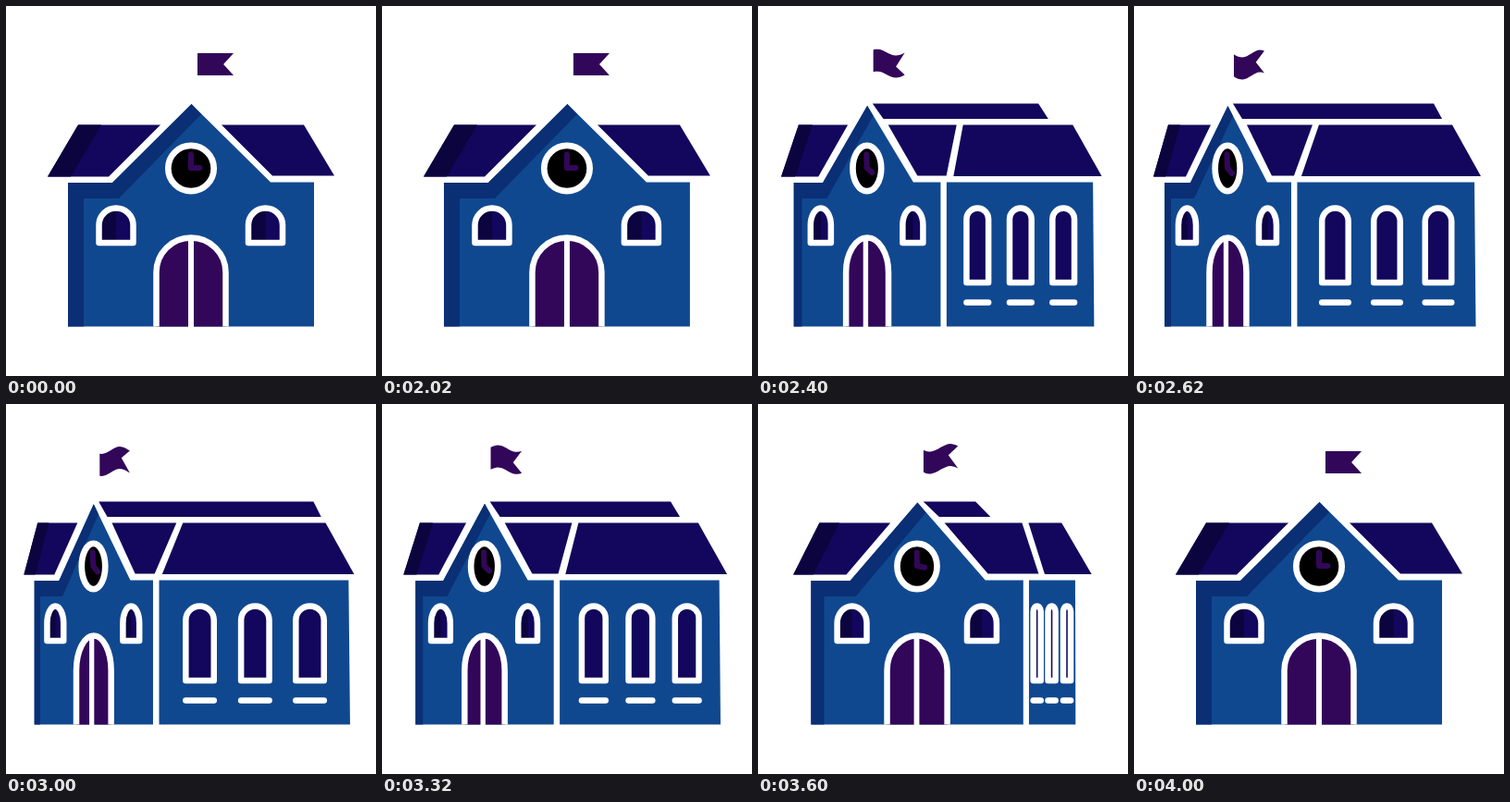
An HTML page that plays this animation: 400 by 400 pixels, repeating every 4.02 s.

```html
<!DOCTYPE html>
<html lang="en">
<head>
<meta charset="utf-8">
<title>Turning schoolhouse</title>
<style>
  html, body { margin: 0; width: 100%; height: 100%; overflow: hidden; background: #fff; }
  svg { display: block; width: 100vw; height: 100vh; }
</style>
</head>
<body>
<svg id="stage" viewBox="0 0 400 400"></svg>
<script>
const LOOP = 4020;
const WALL = '#104890', SHADE = '#0a2f74', ROOF = '#12075c', DARK = '#0b043e', PURPLE = '#320759';

// Keys are [ms, value]; between them a smooth cubic, flat at both ends.
const TURN = [[2015, 0], [2220, .445], [2400, .83], [2520, .96], [2620, 1], [2850, 1.07],
  [3070, 1.05], [3320, .905], [3480, .56], [3600, .285], [3800, .07], [4000, 0]];
const WAVE_PHASE = [[2015, -.4], [2220, .1], [2620, 1.47], [3320, 3.25], [3600, 3.8], [4000, 4.9]];
const WAVE_SIZE = [[2015, 0], [2220, 2.4], [2620, 4], [3320, 3.7], [3600, 4.2], [4000, 0]];
const WAVE_LIFT = [[2015, 0], [2220, -2.1], [2620, .5], [3320, -2.8], [3600, -3.7], [4000, 0]];

function track(keys, t) {
  const last = keys.length - 1;
  if (t <= keys[0][0]) return keys[0][1];
  if (t >= keys[last][0]) return keys[last][1];
  const i = keys.findIndex(k => k[0] > t) - 1;
  const slope = j => j <= 0 || j >= last ? 0
    : (keys[j + 1][1] - keys[j - 1][1]) / (keys[j + 1][0] - keys[j - 1][0]);
  const [t0, a] = keys[i], [t1, b] = keys[i + 1], d = t1 - t0, s = (t - t0) / d;
  const h = s * s * (3 - 2 * s);
  return a + (b - a) * h + d * s * (1 - s) * (slope(i) * (1 - s) - slope(i + 1) * s);
}

let turn = 0;
const mix = (a, b) => a + (b - a) * turn;
const path = pts => 'M' + pts.map(p => p.map(n => n.toFixed(2)).join(' ')).join('L');
const shape = (d, fill, extra = '') => `<path d="${d}" fill="${fill}" ${extra}/>`;
const poly = (pts, fill) => shape(path(pts) + 'Z', fill);
const outline = (d, width = 6.5, color = '#fff') => shape(d, 'none',
  `stroke="${color}" stroke-width="${width}" stroke-linejoin="round" stroke-linecap="round"`);

// Corners given as [front x, turned x, y].
const part = (corners, fill) => poly(corners.map(([a, b, y]) => [mix(a, b), y]), fill);

// Quad that vanishes while its left side lies beyond its right side.
function slab(topLeft, topRight, botLeft, botRight, yTop, yBot, fill) {
  const tr = mix(...topRight), br = mix(...botRight);
  const tl = Math.min(mix(...topLeft), tr), bl = Math.min(mix(...botLeft), br);
  return poly([[tl, yTop], [tr, yTop], [br, yBot], [bl, yBot]], fill);
}

const arch = (x, half, top, spring, bottom) =>
  `M${x - half} ${bottom}V${spring}A${half} ${spring - top} 0 0 1 ${x + half} ${spring}V${bottom}`;

function frontWindow(x) {
  const half = mix(18.5, 9.5), d = arch(x, half, 218.5, 237, 256) + 'Z';
  const left = `M${x} 256H${x - half}V237A${half} 18.5 0 0 1 ${x} 218.5Z`;
  return shape(d, ROOF) + shape(left, DARK) + outline(d);
}

function sideWindow(x) {
  const half = 14.25 * turn, width = 6.5 * Math.min(1, turn * 4);
  const d = arch(x, half, 218.5, 218.5 + Math.max(half, 6), 299) + 'Z';
  return shape(d, ROOF) + outline(d, width) + outline(path([[x - half, 320.5], [x + half, 320.5]]), width);
}

function flag(t) {
  const phase = track(WAVE_PHASE, t), size = track(WAVE_SIZE, t), lift = track(WAVE_LIFT, t);
  const x0 = mix(207, 108), x1 = mix(246, 141);
  const at = (s, y) => [x0 + (x1 - x0) * s, y + lift + size * Math.cos(5.2 * (s - phase))];
  const steps = Array.from({ length: 15 }, (_, i) => i / 14);
  const top = steps.map(s => at(s, 51)), bottom = steps.map(s => at(s, 75)).reverse();
  return poly([...top, at(.72, 63), ...bottom], PURPLE);
}

function roofs() {
  return slab([207, 107], [200, 324], [227, 117], [219, 333], 105.5, 122, ROOF)
    + part([[78, 37, 128.5], [167, 83, 128.5], [111, 56, 184.5], [45, 21, 184.5]], ROOF)
    + part([[78, 37, 128.5], [103, 50, 128.5], [70, 34, 184.5], [45, 21, 184.5]], DARK)
    + part([[233, 122, 128.5], [322, 193, 128.5], [355, 173, 183.5], [288, 149, 183.5]], ROOF)
    + slab([329, 200], [322, 344], [361, 181], [355, 375], 128.5, 184, ROOF);
}

function side() {
  if (turn < .03) return '';
  return slab([339, 176.5], [333, 368], [339, 176.5], [333, 369.5], 190.5, 346.5, WALL)
    + [[335, 217.5], [335, 273.5], [336, 329]].map(c => sideWindow(mix(...c))).join('');
}

function front() {
  return part([[67, 33, 191], [115, 61, 191], [200.5, 101.5, 106 + 2 * turn], [286, 144, 190.5],
      [333, 170, 190.5], [333, 170, 346.5], [67, 33, 346.5]], WALL)
    + part([[67, 33, 191], [115, 61, 191], [200.5, 101.5, 106 + 2 * turn], [211, 107, 117 + 2 * turn],
      [122, 65, 208], [84, 40, 208], [84, 40, 346.5], [67, 33, 346.5]], SHADE)
    + frontWindow(mix(119, 57.5)) + frontWindow(mix(280.5, 144.5));
}

function clock() {
  const x = mix(200, 101.2);
  const hands = path([[mix(200, 100.5), 160.5], [mix(200, 101), 175], [mix(209.5, 106), mix(175, 181)]]);
  return `<ellipse cx="${x}" cy="175.5" rx="${mix(24.7, 13.5)}" ry="24.7" stroke="#fff" stroke-width="6.7"/>`
    + outline(hands, 6, PURPLE);
}

function door() {
  const d = arch(mix(200, 101.5), mix(37.5, 20), 250.5, 288, 346.5), seam = mix(200, 99.5);
  const flat = width => `stroke="#fff" stroke-width="${width}"`;
  return shape(d, PURPLE, flat(6.5)) + shape(`M${seam} 250V347`, 'none', flat(mix(6, 5.3)));
}

const stage = document.getElementById('stage');
function draw(t) {
  turn = track(TURN, t);
  stage.innerHTML = flag(t) + roofs() + side() + front() + clock() + door();
}

const start = performance.now();
function tick() {
  draw((performance.now() - start) % LOOP);
  requestAnimationFrame(tick);
}
tick();
</script>
</body>
</html>
```
